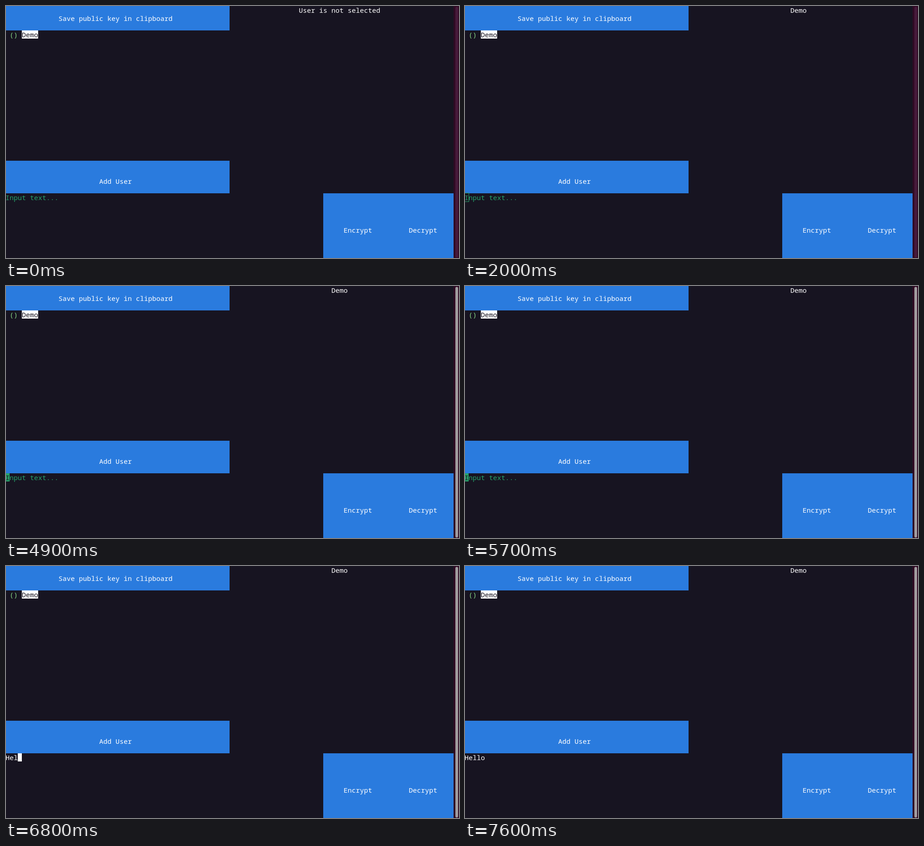
An HTML page with a canvas that plays this animation: 1001 px wide and 557 px high, repeating every 8000 ms.

```html
<!DOCTYPE html>
<html lang="en">
<head>
<meta charset="utf-8">
<style>
html, body { margin: 0; width: 100%; height: 100%; overflow: hidden; background: #171421; }
canvas { display: block; }
</style>
</head>
<body>
<canvas id="stage" width="1001" height="557"></canvas>
<script>
const ctx = document.getElementById('stage').getContext('2d');
const LOOP = 8000, CELL_W = 9, CELL_H = 18;
const BG = '#171421', BLUE = '#2a7bde', GREEN = '#26a269', WHITE = '#ffffff';
const USER = 'Demo', INPUT_ROW = 23;
const KEY_TIMES = [5900, 6500, 6800, 6900, 7100];

const cellX = col => col * CELL_W - 1;

function fillCells(col, row, cols, rows, color) {
  ctx.fillStyle = color;
  ctx.fillRect(cellX(col), row * CELL_H, cols * CELL_W, rows * CELL_H);
}

function write(text, col, row, color = WHITE) {
  ctx.fillStyle = color;
  ctx.fillText(text, cellX(col), row * CELL_H + 15);
}

function drawScrollbar(active) {
  ctx.fillStyle = '#300a24';
  ctx.fillRect(989, 0, 12, 557);
  ctx.fillStyle = active ? '#a19c9f' : '#471a3b';
  ctx.beginPath();
  ctx.roundRect(993, 2, 6, 554, 3);
  ctx.fill();
}

function drawInput(t) {
  const typed = 'Hello'.slice(0, KEY_TIMES.filter(time => t >= time).length);
  if (typed) {
    write(typed, 0, INPUT_ROW);
    if (t < 7600) fillCells(typed.length, INPUT_ROW, 1, 1, WHITE);
    return;
  }
  write('Input text...', 0, INPUT_ROW, GREEN);
  if (t >= 2000 && t < 4800) {
    ctx.strokeStyle = GREEN;
    ctx.strokeRect(-1.5, 413.5, 10, 19);
  } else if (t >= 4800 && (t < 5400 || t >= 5700)) {
    fillCells(0, INPUT_ROW, 1, 1, GREEN);
    write('I', 0, INPUT_ROW, BG);
  }
}

function draw(t) {
  ctx.fillStyle = BG;
  ctx.fillRect(0, 0, 1001, 557);
  ctx.font = '15px "Noto Sans Mono", monospace';
  ctx.lineWidth = 1;

  fillCells(0, 0, 55, 3, BLUE);
  write('Save public key in clipboard', 13, 1);
  write('()', 1, 3, '#87d787');
  fillCells(4, 3, 4, 1, WHITE);
  write(USER, 4, 3, BG);
  fillCells(0, 19, 55, 4, BLUE);
  write('Add User', 23, 21);

  if (t < 800) write('User is not selected', 72, 0);
  else write(USER, 80, 0);

  fillCells(78, 23, 32, 8, BLUE);
  write('Encrypt', 83, 27);
  write('Decrypt', 99, 27);

  drawInput(t);
  drawScrollbar(t >= 4900);
}

const start = performance.now();
function tick() {
  draw((performance.now() - start) % LOOP);
  requestAnimationFrame(tick);
}
tick();
</script>
</body>
</html>
```
